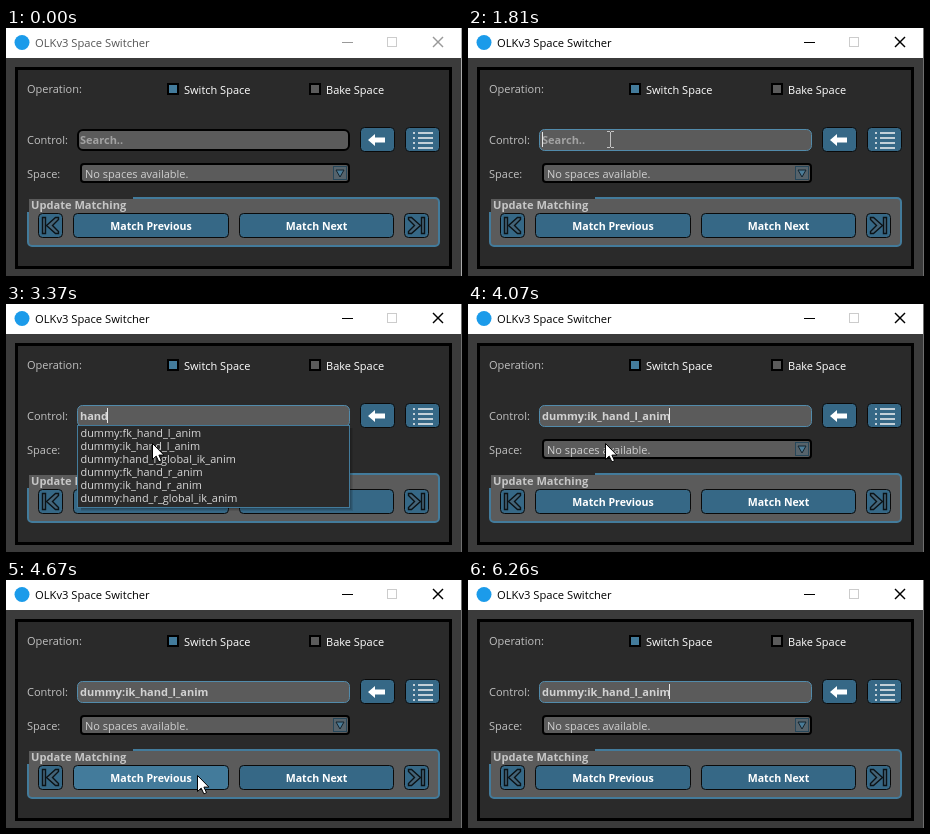
Animation, 456 px wide and 248 px high, one loop 6510 ms. Source, as an HTML page with a canvas:

```html
<!DOCTYPE html>
<html lang="en">
<head>
<meta charset="utf-8">
<title>Space Switcher</title>
<style>
  html, body { margin: 0; width: 100%; height: 100%; overflow: hidden; background: #3b3b3b; }
  canvas { display: block; width: 456px; height: 248px; }
</style>
</head>
<body>
<canvas id="stage" width="456" height="248"></canvas>
<script>
const LOOP = 6510, STEP = 120, BLINK = 530;
const FOCUS = 690, TYPE = 2050, PICK = 3830, LAST_KEY = 4100;
const BLUE = '#366886', EDGE = '#437b9b', GRAY = '#5b5b5b', PANEL = '#2a2a2a';
const FONT = '"Open Sans", "Noto Sans", sans-serif';
const c = document.getElementById('stage').getContext('2d');

const easeOut = p => 1 - (1 - p) ** 4;
const linear = p => p;

// The pointer glides from one place to another, then rests until the next glide.
const GLIDES = [
  { start: 250, end: 730, from: [260, 229], to: [138, 113], ease: easeOut },
  { start: 850, end: 970, from: [142, 111], to: [142, 111], ease: linear },
  { start: 2880, end: 3710, from: [345, 229], to: [140, 136], ease: easeOut },
  { start: PICK, end: 4190, from: [140, 136], to: [135, 141], ease: linear },
  { start: 4430, end: 4910, from: [135, 141], to: [247, 248], ease: linear }
];

function pointerAt(t) {
  const g = GLIDES.findLast(g => g.start <= t);
  if (!g) return null;
  const steps = Math.floor((t - g.start) / STEP) * STEP;
  const p = g.ease(Math.min(1, steps / (g.end - g.start)));
  return g.from.map((v, i) => Math.round(v + (g.to[i] - v) * p));
}

function typedAt(t) {
  if (t < TYPE) return '';
  if (t >= PICK) return 'dummy:ik_hand_l_anim';
  return 'hand'.slice(0, 2 + Math.floor((t - TYPE) / STEP));
}

function caretAt(t) {
  if (t < FOCUS) return false;
  if (t >= TYPE && t < LAST_KEY) return true;
  const since = t - (t < TYPE ? FOCUS : LAST_KEY);
  return Math.floor(since / BLINK) % 2 === 0;
}

function rect(x, y, w, h, color) {
  c.fillStyle = color;
  c.fillRect(x, y, w, h);
}

// Rounded box with its border drawn inside the given bounds.
function box(x, y, w, h, fill, border, line, radius) {
  c.beginPath();
  c.roundRect(x + line / 2, y + line / 2, w - line, h - line, radius);
  c.fillStyle = fill;
  c.fill();
  c.strokeStyle = border;
  c.lineWidth = line;
  c.stroke();
}

function text(str, x, y, color, { bold = false, size = 11, align = 'left' } = {}) {
  c.font = `${bold ? 'bold ' : ''}${size}px ${FONT}`;
  c.textAlign = align;
  c.fillStyle = color;
  c.fillText(str, x, y);
}

function path(points, { fill, stroke, line = 1, close = true }) {
  c.beginPath();
  for (const [x, y] of points) c.lineTo(x, y);
  if (close) c.closePath();
  if (fill) { c.fillStyle = fill; c.fill(); }
  if (stroke) { c.strokeStyle = stroke; c.lineWidth = line; c.stroke(); }
}

function titleBar(active) {
  const ink = active ? '#000' : '#999';
  rect(0, 0, 455, 30, '#fff');
  rect(455, 0, 1, 248, active ? '#6f6f6f' : '#aaa');
  c.beginPath();
  c.arc(16, 14.5, 7.5, 0, Math.PI * 2);
  c.fillStyle = '#1b9bea';
  c.fill();
  text('OLKv3 Space Switcher', 29, 19, active ? '#000' : '#555', { size: 11.2 });
  rect(336, 14, 11, 1, ink);
  c.strokeStyle = '#ccc';
  c.lineWidth = 1;
  c.strokeRect(381.5, 9.5, 9, 9);
  for (const d of [-5, 5]) {
    path([[432 - d, 9], [432 + d, 19]], { stroke: ink, line: 1.4, close: false });
  }
}

function checkbox(x, label, on) {
  rect(x, 55, 12, 12, '#000');
  rect(x + 2, 57, 8, 8, on ? EDGE : GRAY);
  text(label, x + 17, 66, '#fff');
}

function button(x, y, w, h, label, hover) {
  box(x, y, w, h, hover ? EDGE : BLUE, '#0a0a0a', 1, 4);
  if (label) text(label, x + w / 2, y + 17, '#fff', { bold: true, size: 10.6, align: 'center' });
}

// Bar and chevron, mirrored by dir.
function skipButton(x, dir) {
  button(x, 185, 25, 25);
  const shape = points => path(points.map(([dx, dy]) => [x + 12.5 + dx * dir, 197.5 + dy]),
    { fill: '#446478', stroke: '#0b1216', line: 1.4 });
  shape([[-8, -8], [-5, -8], [-5, 8], [-8, 8]]);
  shape([[-4, 0], [5, -8], [8, -8], [8, -6], [2, 0], [8, 6], [8, 8], [5, 8]]);
}

function field(str, focused, caret) {
  box(71, 101, 273, 22, GRAY, focused ? '#528bab' : '#000', focused ? 1 : 2, 5);
  text(str || 'Search..', 74, 116, str ? '#d2d2d2' : '#a3a3a3', { bold: true });
  if (!caret) return;
  const x = str ? 73 + Math.round(c.measureText(str).width) : 74;
  rect(x, 104, 1, 15, '#e6e6e6');
}

function toolButtons() {
  button(354, 99, 35, 25);
  path([[362, 112], [369, 106], [369, 109.5], [379, 109.5], [379, 114.5], [369, 114.5], [369, 118]],
    { fill: '#fff' });
  button(399, 99, 35, 25);
  for (let y = 104; y < 121; y += 5) {
    rect(407, y, 2, 2, '#c3d0d8');
    rect(412, y, 15, 2, '#c3d0d8');
  }
}

function combo() {
  box(74, 135, 270, 20, GRAY, '#000', 2, 3);
  text('No spaces available.', 79, 150, '#cfcfcf');
  rect(327, 138, 14, 14, '#27475a');
  rect(328, 139, 12, 12, '#56636b');
  path([[330, 142], [338, 142], [334, 149]], { fill: '#4b7c98', stroke: '#14232c' });
}

function matching(hover) {
  box(21, 169, 413, 50, GRAY, EDGE, 2, 4);
  rect(21, 169, 106, 15, PANEL);
  rect(23, 171, 104, 13, GRAY);
  text('Update Matching', 25, 181, '#c6c6c6', { bold: true, size: 11.1 });
  skipButton(32, 1);
  button(67, 185, 156, 25, 'Match Previous', hover);
  button(233, 185, 155, 25, 'Match Next');
  skipButton(398, -1);
}

function popup() {
  for (let i = 0; i < 4; i++) rect(75, 124, 269 + i, 80 + i, 'rgba(0,0,0,.1)');
  rect(71, 121, 273, 83, EDGE);
  rect(72, 122, 271, 81, PANEL);
  const names = ['l', 'r'].flatMap(s =>
    [`fk_hand_${s}_anim`, `ik_hand_${s}_anim`, `hand_${s}_global_ik_anim`]);
  names.forEach((name, i) => text('dummy:' + name, 74.5, 133 + 13 * i, '#d8d8d8', { size: 10.9 }));
}

function arrow(x, y) {
  path([[0, 0], [0, 16], [3.7, 12.6], [6.4, 18.4], [9, 17.2], [6.4, 11.6], [11.4, 11.6]]
    .map(([dx, dy]) => [x + dx + .5, y + dy + .5]), { fill: '#fff', stroke: '#000' });
}

function beam(x, y) {
  const ink = '#c4c4c4';
  rect(x, y - 7, 1, 15, ink);
  for (const dy of [-8, 8]) {
    rect(x - 3, y + dy, 3, 1, ink);
    rect(x + 1, y + dy, 3, 1, ink);
  }
}

function draw(t) {
  const open = t >= TYPE && t < PICK;
  const focused = t >= FOCUS;
  const pointer = pointerAt(t);
  const [px, py] = pointer || [-50, -50];
  const inside = (x, y, w, h) => px >= x && px < x + w && py >= y && py < y + h;

  rect(0, 0, 456, 248, '#3b3b3b');
  titleBar(focused);
  rect(9, 39, 437, 202, '#000');
  rect(12, 42, 431, 196, PANEL);

  text('Operation:', 21, 65, '#c0c0c0');
  text('Control:', 21, 116, '#c0c0c0');
  text('Space:', 21, 150, '#c0c0c0');
  checkbox(161, 'Switch Space', true);
  checkbox(303, 'Bake Space', false);
  field(typedAt(t), focused, caretAt(t));
  toolButtons();
  combo();
  matching(!open && inside(67, 185, 156, 25));
  if (open) popup();

  if (!pointer) return;
  if (!open && inside(71, 101, 273, 22)) beam(px, py);
  else arrow(px, py);
}

function tick(now) {
  draw(now % LOOP);
  requestAnimationFrame(tick);
}
draw(0);
requestAnimationFrame(tick);
</script>
</body>
</html>
```
